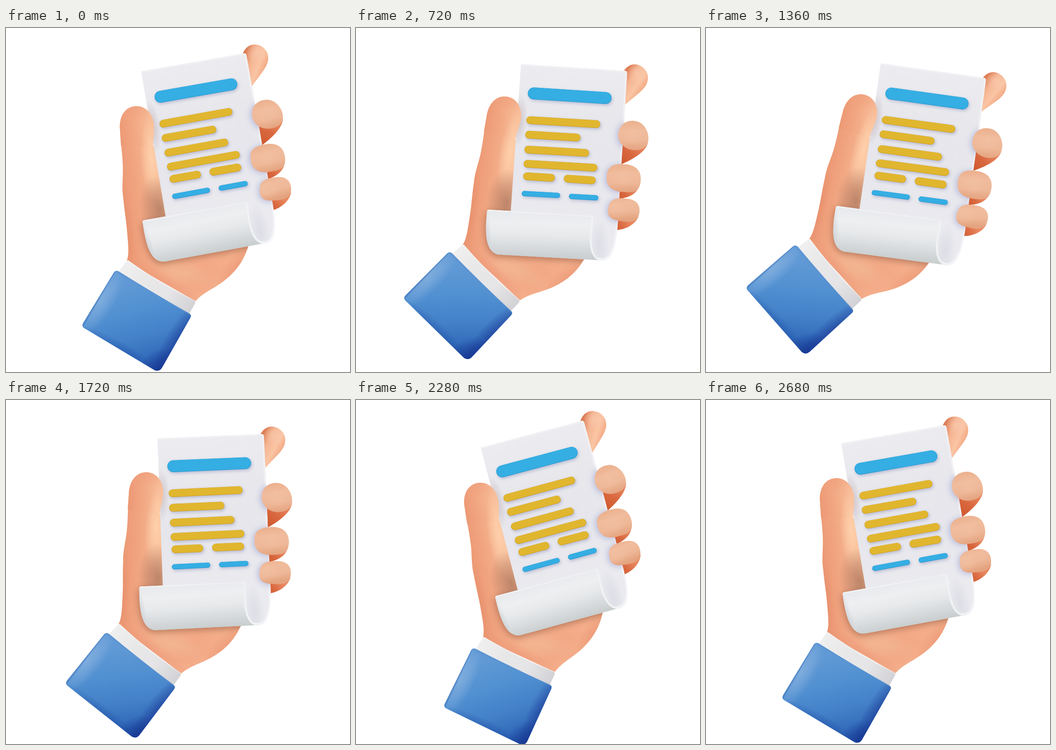
Animation of 748 by 748 pixels, one loop 2.88 s. Source, as an HTML page with a canvas:

```html
<!DOCTYPE html>
<html lang="en">
<head>
<meta charset="utf-8">
<title>Hand with receipt</title>
<style>
html, body { margin: 0; width: 100%; height: 100%; overflow: hidden; background: #fff; }
canvas { display: block; width: 748px; height: 748px; }
</style>
</head>
<body>
<canvas id="stage" width="748" height="748"></canvas>
<script>
const ctx = document.getElementById('stage').getContext('2d');
const LOOP = 2880, STEP = 40;
const PIVOT = { x: 391.5, y: 359 };
// [time in ms, tilt in degrees]; the artwork is drawn at a tilt of -10
const KEYS = [[0, -10], [1160, 10], [2280, -15], [2480, -5], [2680, -10], [LOOP, -10]];

const shape = d => new Path2D(d);
const hand = shape('M248 222C245 190 261 170 284 170C306 170 322 190 322 216C322 236 320 252 320 256L400 360L530 440L527 474C518 503 503 527 475 549C452 567 430 574 412 594L262 508C268 494 266 474 264 450C262 420 257 395 255 370C251 345 255 325 254 300C253 270 249 250 248 222Z');
const thumbTip = shape('M248 222C245 190 261 170 284 170C306 170 322 190 322 216C322 236 319 244 320 256L250 256Z');
const indexTip = shape('M515 55C521 41 531 35 543 36C560 38 572 52 570 68C569 84 556 97 533 129L518 58Z');
const paper = shape('M294 94L518 55Q522 55 523 60L576 362C583 395 586 424 583 445C579 465 568 470 553 469L347 409Z');
const roll = shape('M297 421Q297 419 300 418L520 379C524 381 525 392 526 404C529 438 540 466 557 469L344 508C313 510 303 466 297 421Z');
const rollEdge = shape('M522 380C525 388 526 396 527 406C530 440 541 465 558 467');
const curlEdge = shape('M577 375C583 408 585 428 581 445C577 463 567 467 556 466');
const cuff = shape('M267 506Q264 503 261 508L244 531Q318 586 398 622L411 599Q413 595 409 592Q332 553 267 506Z');
const sleeve = shape('M235 531Q239 526 245 529Q321 577 399 621Q404 624 401 630L339 739Q333 748 323 744L169 652Q164 648 168 641Z');

const fingers = [
  { tip: shape('M535 183C537 164 553 155 570 156C590 158 604 180 602 197C600 212 585 219 568 219C547 218 533 202 535 183Z'),
    under: shape('M540 205L602 194C604 212 585 234 555 256Z'), box: [156, 219, 256] },
  { tip: shape('M532 284C529 264 543 256 569 252C592 250 605 261 607 283C608 304 600 309 571 313C546 316 533 304 532 284Z'),
    under: shape('M560 300L605 297C602 312 588 322 569 329Z'), box: [252, 313, 329] },
  { tip: shape('M552 353C550 333 565 326 592 324C612 323 620 336 620 350C620 368 609 374 582 375C560 377 552 369 552 353Z'),
    under: shape('M570 368L620 357C616 377 599 390 581 396Z'), box: [324, 375, 396] }
];

// colors, thickness, then start and end centres
const BLUE = ['#35aee3', '#2b9dd2'], GOLD = ['#e1b62f', '#cfa426'];
const bars = [
  [BLUE, 26, 336, 149.5, 490, 122.5],
  [GOLD, 17, 342, 208, 484, 182.5],
  [GOLD, 17, 347, 239, 449, 221],
  [GOLD, 17, 353, 271, 475, 249],
  [GOLD, 17, 358.5, 301.5, 500, 276],
  [GOLD, 17, 364, 328, 415.5, 319],
  [GOLD, 17, 451, 312.5, 503, 303.5],
  [BLUE, 11.5, 367, 366, 438, 353],
  [BLUE, 11.5, 468, 348, 520, 338.5]
];

function linear(x0, y0, x1, y1, ...colors) {
  const g = ctx.createLinearGradient(x0, y0, x1, y1);
  colors.forEach((c, i) => g.addColorStop(i / (colors.length - 1), c));
  return g;
}

function fill(path, style) {
  ctx.fillStyle = style;
  ctx.fill(path);
}

function stroke(path, color, width) {
  ctx.strokeStyle = color;
  ctx.lineWidth = width;
  ctx.stroke(path);
}

function inside(path, draw) {
  ctx.save();
  ctx.clip(path);
  draw();
  ctx.restore();
}

function withShadow(color, blur, dx, dy, draw) {
  ctx.save();
  ctx.shadowColor = color;
  ctx.shadowBlur = blur;
  ctx.shadowOffsetX = dx;
  ctx.shadowOffsetY = dy;
  draw();
  ctx.restore();
}

// Soft elliptical patch of light or shade
function glow(x, y, rx, ry, degrees, rgb, alpha) {
  ctx.save();
  ctx.translate(x, y);
  ctx.rotate(degrees * Math.PI / 180);
  ctx.scale(rx, ry);
  const g = ctx.createRadialGradient(0, 0, 0, 0, 0, 1);
  g.addColorStop(0, `rgba(${rgb},${alpha})`);
  g.addColorStop(0.5, `rgba(${rgb},${alpha * 0.55})`);
  g.addColorStop(1, `rgba(${rgb},0)`);
  ctx.fillStyle = g;
  ctx.fillRect(-1, -1, 2, 2);
  ctx.restore();
}

function drawHand() {
  fill(hand, linear(248, 300, 335, 290, '#ec9974', '#f1a480', '#f5b28e', '#f9c29d'));
  inside(hand, () => {
    glow(420, 540, 190, 110, -25, '241,160,126', 0.9);
    glow(395, 535, 75, 28, 10, '241,186,150', 0.65);
    glow(316, 285, 24, 95, -4, '255,211,174', 0.9);
    glow(282, 172, 40, 30, 0, '238,155,120', 0.5);
    glow(520, 520, 40, 90, 40, '232,140,106', 0.7);
    glow(335, 395, 45, 75, -10, '142,88,68', 0.55);
    glow(262, 440, 16, 100, -4, '230,138,106', 0.5);
    glow(340, 552, 110, 22, 30, '234,148,116', 0.5);
    withShadow('rgba(125,65,42,.55)', 16, -1, 4, () => fill(roll, '#d9dcde'));
  });
}

function drawPaper() {
  fill(paper, linear(405, 75, 470, 400, '#ececf0', '#e7e7ec', '#e6e6ec', '#eaeaef'));
  inside(paper, () => {
    stroke(shape('M521 55L577 372'), '#f0f0f4', 6);
    stroke(shape('M294 95L520 56'), '#f1f1f4', 4);
    glow(318, 215, 18, 58, -8, '196,180,184', 0.65);
    glow(552, 440, 22, 60, -12, '208,211,220', 0.5);
    stroke(curlEdge, '#f2f3f6', 5);
  });
}

function drawBars() {
  ctx.lineCap = 'round';
  for (const [[face, rim], width, x0, y0, x1, y1] of bars) {
    withShadow('rgba(128,132,180,.45)', 6, 2, 3, () =>
      stroke(shape(`M${x0} ${y0}L${x1} ${y1}`), rim, width));
    stroke(shape(`M${x0} ${y0 - 0.5}L${x1} ${y1 - 0.5}`), face, width - 1.5);
  }
}

function drawThumbTip() {
  fill(thumbTip, linear(248, 240, 326, 230, '#ec9974', '#f1a480', '#f5b28e', '#f8be9b'));
  inside(thumbTip, () => {
    glow(282, 172, 40, 30, 0, '238,155,120', 0.5);
    glow(316, 260, 22, 70, -4, '255,211,174', 0.8);
  });
}

function drawRoll() {
  fill(roll, linear(410, 399, 430, 493, '#e9eaed', '#eeeff1', '#e7e9eb', '#d9dcde', '#c9cecf'));
  inside(roll, () => {
    glow(306, 475, 14, 65, -16, '190,196,202', 0.5);
    stroke(shape('M298 420L521 379'), '#f1f2f4', 3);
  });
  stroke(rollEdge, '#f1f2f4', 4);
}

function drawTip({ tip, box: [top, bottom] }) {
  const tone = linear(560, top, 576, bottom, '#ebb08d', '#f0bc9d', '#eeb898', '#e4a37f');
  inside(paper, () => withShadow('rgba(150,155,205,.6)', 14, -3, 2, () => fill(tip, tone)));
  fill(tip, tone);
  inside(tip, () => glow(568, (top + bottom) / 2, 25, 22, 0, '243,196,168', 0.4));
}

function drawSleeve() {
  fill(cuff, linear(250, 515, 407, 608, '#f1f0f0', '#e9e8e9', '#e5e4e6', '#d2d1d5'));
  inside(cuff, () => {
    stroke(shape('M242 533Q318 582 400 625'), 'rgba(186,178,180,.3)', 7);
    stroke(shape('M264 505Q332 553 412 594'), 'rgba(255,255,255,.35)', 3);
  });
  fill(sleeve, linear(250, 560, 292, 735, '#6099d5', '#5190d1', '#4380c8', '#2e66b7'));
  inside(sleeve, () => {
    glow(206, 594, 30, 90, 31, '145,184,226', 0.65);
    glow(384, 690, 42, 125, 30, '22,48,143', 0.8);
    glow(255, 712, 120, 25, 31, '25,70,160', 0.5);
    glow(332, 742, 55, 40, -45, '16,42,135', 0.65);
    stroke(shape('M238 528Q320 578 404 624'), 'rgba(90,145,208,.5)', 4);
    stroke(shape('M236 529L167 647'), 'rgba(60,116,188,.5)', 4);
  });
}

function drawArt() {
  fill(indexTip, linear(516, 65, 568, 85, '#dc7c54', '#f5b592', '#fac5a4', '#f2a580'));
  inside(indexTip, () => glow(546, 54, 25, 22, 0, '248,200,172', 0.75));
  for (const { under, box } of fingers) {
    fill(under, linear(595, box[1] - 12, 565, box[2], '#e98860', '#d9683f', '#cf592f'));
  }
  drawHand();
  drawPaper();
  drawBars();
  drawThumbTip();
  drawRoll();
  fingers.forEach(drawTip);
  drawSleeve();
}

function tiltAt(time) {
  const i = KEYS.findIndex(([t], n) => n > 0 && time < t);
  const [t0, a0] = KEYS[i - 1], [t1, a1] = KEYS[i];
  const p = (time - t0) / (t1 - t0);
  return a0 + (a1 - a0) * p * p * (3 - 2 * p);
}

function frame() {
  const time = Math.floor(performance.now() % LOOP / STEP) * STEP;
  ctx.setTransform(1, 0, 0, 1, 0, 0);
  ctx.fillStyle = '#fff';
  ctx.fillRect(0, 0, 748, 748);
  ctx.translate(PIVOT.x, PIVOT.y);
  ctx.rotate((tiltAt(time) + 10) * Math.PI / 180);
  ctx.translate(-PIVOT.x, -PIVOT.y);
  drawArt();
  requestAnimationFrame(frame);
}
frame();
</script>
</body>
</html>
```
